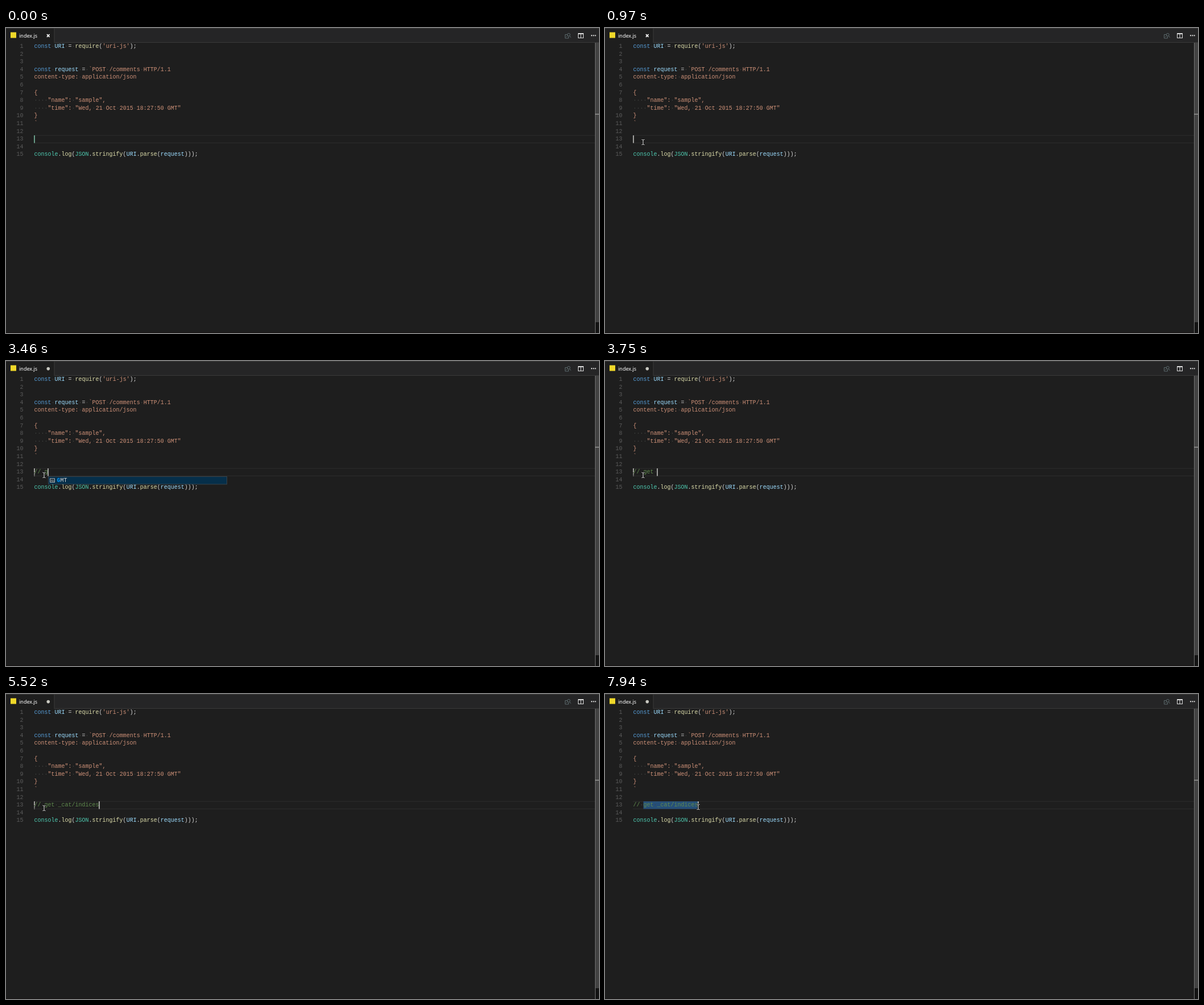
Recreate the animation shown at these times as an HTML page. Size 1043x537 px, loop 8 s.

```html
<!DOCTYPE html>
<html lang="en">
<head>
<meta charset="utf-8">
<title>index.js</title>
<style>
  html, body { margin: 0; width: 100%; height: 100%; overflow: hidden; background: #1e1e1e; }
  svg { display: block; width: 100%; height: 100%; }
  text { white-space: pre; }
  .code { font: 10px "Liberation Mono", monospace; fill: #d4d4d4; }
  .num { fill: #5a5a5a; text-anchor: end; }
  .tab { font: 9px "Noto Sans", sans-serif; fill: #fff; }
  .k { fill: #569cd6; } .v { fill: #9cdcfe; } .f { fill: #dcdcaa; }
  .s { fill: #ce9178; } .t { fill: #4ec9b0; } .c { fill: #608b4e; }
  .dot { fill: #424340; }
</style>
</head>
<body>
<svg viewBox="0 0 1043 537">
  <rect width="1043" height="537" fill="#1e1e1e"/>
  <g id="tabs">
    <rect x="85" y="1" width="958" height="25" fill="#252526"/>
    <rect width="1043" height="1" fill="#3a3a3a"/>
    <rect x="85" y="25" width="958" height="1" fill="#393939"/>
    <rect x="84.5" y="1" width="1" height="25" fill="#3a3a3a"/>
    <rect x="8" y="7.5" width="10" height="10" fill="#f0d829"/>
    <text class="tab" x="23" y="16.5">index.js</text>
    <path id="close" d="M72 11.2l4.6 4.6M76.6 11.2l-4.6 4.6" stroke="#fff" stroke-width="1.7"/>
    <circle id="dirty" cx="74.3" cy="13.6" r="2.8" fill="#c8c8c0"/>
    <g fill="none" stroke="#5b696c">
      <path d="M987 11.5h-3.5v6.5h6v-3"/>
      <circle cx="989.8" cy="11.8" r="2.4"/>
      <path d="M991.3 13.7l2.2 3M985.5 15.5l2.5-2.2"/>
    </g>
    <path d="M1006 9h10v9h-10zM1007 11v6h3.5v-6zM1011.5 11v6h3.5v-6z" fill="#dcdcdc" fill-rule="evenodd"/>
    <path d="M1029 12.3h2v2h-2zM1032.3 12.3h2v2h-2zM1035.6 12.3h2v2h-2z" fill="#dcdcdc"/>
  </g>
  <g id="scrollbar">
    <rect x="1037" y="26" width="6" height="492" fill="#424242"/>
    <rect x="1037" y="518" width="6" height="19" fill="#131313"/>
    <rect x="1036" y="26" width="1" height="511" fill="#707070"/>
    <rect x="1036" y="151" width="7" height="1.4" fill="#9c9c9a"/>
    <rect y="535.5" width="1036" height="1.5" fill="#191617"/>
  </g>
  <path d="M49 189.2H1036M49 202.3H1036" stroke="#2d2d2d"/>
  <rect id="selection" x="67.5" y="189" height="13.4" fill="#264f78"/>
  <g id="lines"></g>
  <path id="residue" d="M49.3 189h1.4v7.5h-1.4zM49.3 198h1.4v2h-1.4zM49.3 201.3h1.4v1.2h-1.4z" fill="#d2d2cc"/>
  <rect id="caret" y="189" width="1.4" height="13.5"/>
  <g id="popup">
    <rect x="74.5" y="203.5" width="314" height="13.5" fill="#062f4a" stroke="#37424a"/>
    <rect x="77.5" y="207" width="8" height="6.5" fill="#26343d" stroke="#a9b4ba"/>
    <path d="M79 211.8v-1.5h1.2v1.5M81 209v2.8h1.2v-1.5M84.5 210.3h-1.2v1.5h1.2" stroke="#a9b4ba" stroke-width=".6" fill="none"/>
    <text class="code" x="89.5" y="213"><tspan fill="#0097fb" font-weight="bold">G</tspan>MT</text>
  </g>
  <g id="mouse" fill="none">
    <path id="beam" d="M-2.5 -4.5H-1.2L0 -3.6L1.2 -4.5H2.5M0 -3.6V3.6M-2.5 4.5H-1.2L0 3.6L1.2 4.5H2.5" stroke="#101010" stroke-width="2.6"/>
    <use href="#beam" style="stroke:#fff"/>
    <path d="M-2.5 -4.5H-1.2L0 -3.6L1.2 -4.5H2.5M0 -3.6V3.6M-2.5 4.5H-1.2L0 3.6L1.2 4.5H2.5" stroke="#f2f2f2"/>
  </g>
</svg>
<script>
const DURATION = 8000, LEFT = 49.5, CHAR = 6, TOP = 25.5, ROW = 13.6;
const COMMENT = '// get _cat/indices';
const $ = id => document.getElementById(id);

// Each line is a list of [class, text] tokens.
const source = [
  [['k', 'const '], ['v', 'URI'], ['', ' = '], ['f', 'require'], ['', '('], ['s', "'uri-js'"], ['', ');']],
  [], [],
  [['k', 'const '], ['v', 'request'], ['', ' = '], ['s', '`POST /comments HTTP/1.1']],
  [['s', 'content-type: application/json']],
  [],
  [['s', '{']],
  [['s', '    "name": "sample",']],
  [['s', '    "time": "Wed, 21 Oct 2015 18:27:50 GMT"']],
  [['s', '}']],
  [['s', '`']],
  [], [], [],
  [['t', 'console'], ['', '.'], ['f', 'log'], ['', '('], ['t', 'JSON'], ['', '.'], ['f', 'stringify'], ['', '('],
   ['v', 'URI'], ['', '.'], ['f', 'parse'], ['', '('], ['v', 'request'], ['', ')));']]
];

const tokenMarkup = ([kind, text]) =>
  `<tspan class="${kind}">${text.replace(/ /g, '<tspan class="dot">·</tspan>')}</tspan>`;

$('lines').innerHTML = source.map((tokens, i) => {
  const y = TOP + ROW * i + 9.5;
  return `<text class="code num" x="30.5" y="${y}">${i + 1}</text>` +
    `<text class="code" id="row${i + 1}" x="${LEFT}" y="${y}">${tokens.map(tokenMarkup).join('')}</text>`;
}).join('');

const typeTimes = [2670, 2740, 3140, 3460, 3520, 3600, 3750, 4140, 4290, 4370, 4450, 4600,
  4910, 4980, 5060, 5210, 5290, 5440, 5520];

// time, pointer x, pointer y, caret column while dragging
const pointerSteps = [
  [890, 56, 158], [970, 67, 201], [6310, 67, 196], [6390, 67, 192], [6780, 67, 193],
  [7010, 67.5, 195, 3], [7180, 85, 198, 3], [7250, 110, 199, 3], [7330, 136, 199, 10],
  [7410, 160, 199, 15], [7490, 178, 199, 19], [7560, 187, 199, 19], [7940, 164, 199, 19]
];

function pointerAt(t) {
  if (t < 890) {
    const p = Math.min(10, Math.floor((t - 70) / 74)) / 10;
    const eased = 1 - (1 - p) ** 2;
    return [t, 757 - 715 * eased, 473 - 356 * eased];
  }
  return pointerSteps.filter(step => step[0] <= t).pop();
}

const show = (id, on) => $(id).setAttribute('visibility', on ? 'visible' : 'hidden');
let shownLength = -1;

function render(t) {
  const length = typeTimes.filter(time => time <= t).length;
  if (length !== shownLength) {
    $('row13').innerHTML = tokenMarkup(['c', COMMENT.slice(0, length)]);
    shownLength = length;
  }
  const [, x, y, dragColumn] = pointerAt(t);
  const column = dragColumn ?? length;

  show('mouse', t >= 70);
  $('mouse').setAttribute('transform', `translate(${x} ${y})`);
  show('caret', t < 5990 || t >= 7010);
  $('caret').setAttribute('x', LEFT + CHAR * column - .2);
  $('caret').setAttribute('fill', t < 890 ? '#86d2b4' : '#d8d8d4');
  $('selection').setAttribute('width', dragColumn ? CHAR * (dragColumn - 3) : 0);
  show('residue', length > 0 && t < 7330);
  show('popup', t >= 3460 && t < 3520);
  show('close', length === 0);
  show('dirty', length > 0);
}

function frame() {
  render(performance.now() % DURATION);
  requestAnimationFrame(frame);
}
frame();
</script>
</body>
</html>
```
